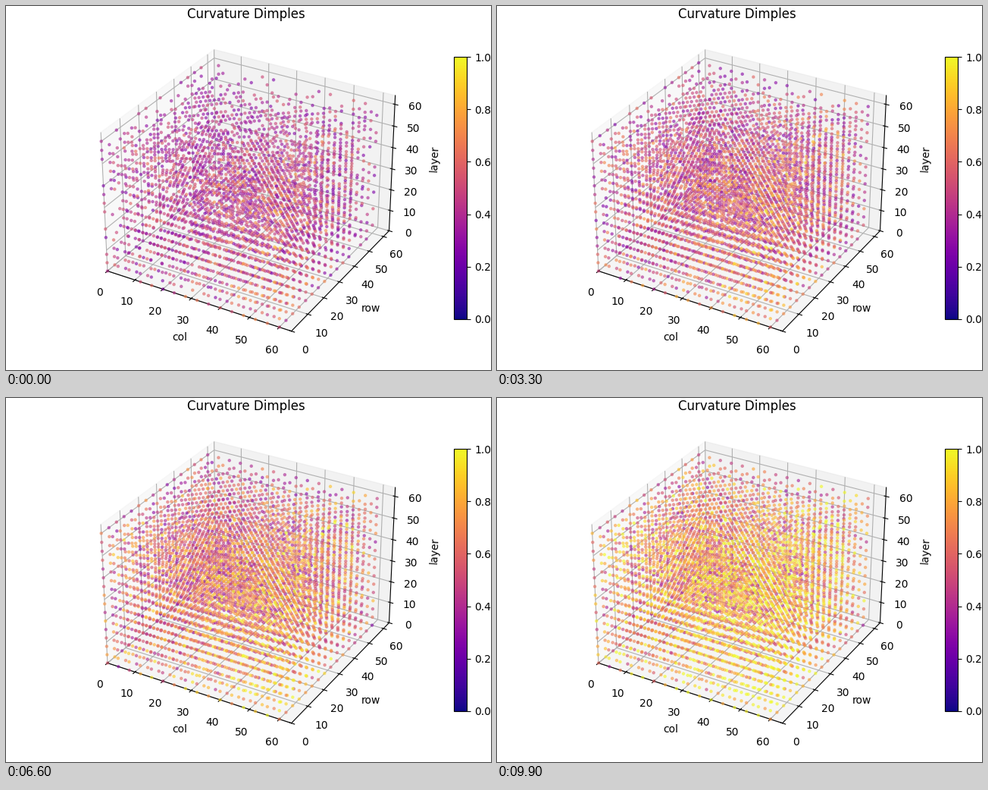
Write a matplotlib script that moves like this. It is 640 px wide and 480 px high and loops after 10 s.

```python
import numpy as np
import matplotlib.pyplot as plt
from matplotlib.animation import FuncAnimation
from matplotlib.cm import ScalarMappable
from matplotlib.colors import Normalize

W, H, DPI = 640, 480, 100
FRAMES, INTERVAL = 100, 100
SIZE, STEP = 64, 4
THRESHOLD = 0.25
ALPHA = 0.5

plt.rcParams["font.family"] = "DejaVu Sans"
cmap = plt.get_cmap("plasma")
rng = np.random.default_rng(7)

# Lattice of sites, brightest towards high col and low row
axis = np.arange(0, SIZE, STEP)
col, row, layer = (g.ravel() for g in np.meshgrid(axis, axis, axis, indexing="ij"))
lean = (1 + (col - row) / axis[-1]) / 2
base = 0.26 + 0.38 * lean**2 + rng.uniform(-0.25, 0.25, col.size)
rate = rng.uniform(0.2, 0.55, col.size)


def site_colors(frame):
    value = base + rate * frame / (FRAMES - 1)
    rgba = cmap(np.clip(value, 0, 1))
    rgba[:, 3] = np.where(value > THRESHOLD, ALPHA, 0)
    return rgba


fig = plt.figure(figsize=(W / DPI, H / DPI), dpi=DPI)
ax = fig.add_axes([101.3 / W, 0.05, 432 / W, 0.9], projection="3d")
dots = ax.scatter(col, row, layer, s=5, c=site_colors(0), depthshade=False)
ax.set(xlim=(0, SIZE), ylim=(0, SIZE), zlim=(0, SIZE),
       xlabel="col", ylabel="row", zlabel="layer")
ax.set_title("Curvature Dimples")

cax = fig.add_axes([591 / W, 0.14, 17.28 / W, 0.72])
fig.colorbar(ScalarMappable(Normalize(0, 1), cmap), cax=cax)


def update(frame):
    dots.set_facecolor(site_colors(frame))
    return (dots,)


anim = FuncAnimation(fig, update, frames=FRAMES, interval=INTERVAL,
                     repeat=True, repeat_delay=0)
plt.show()
```
